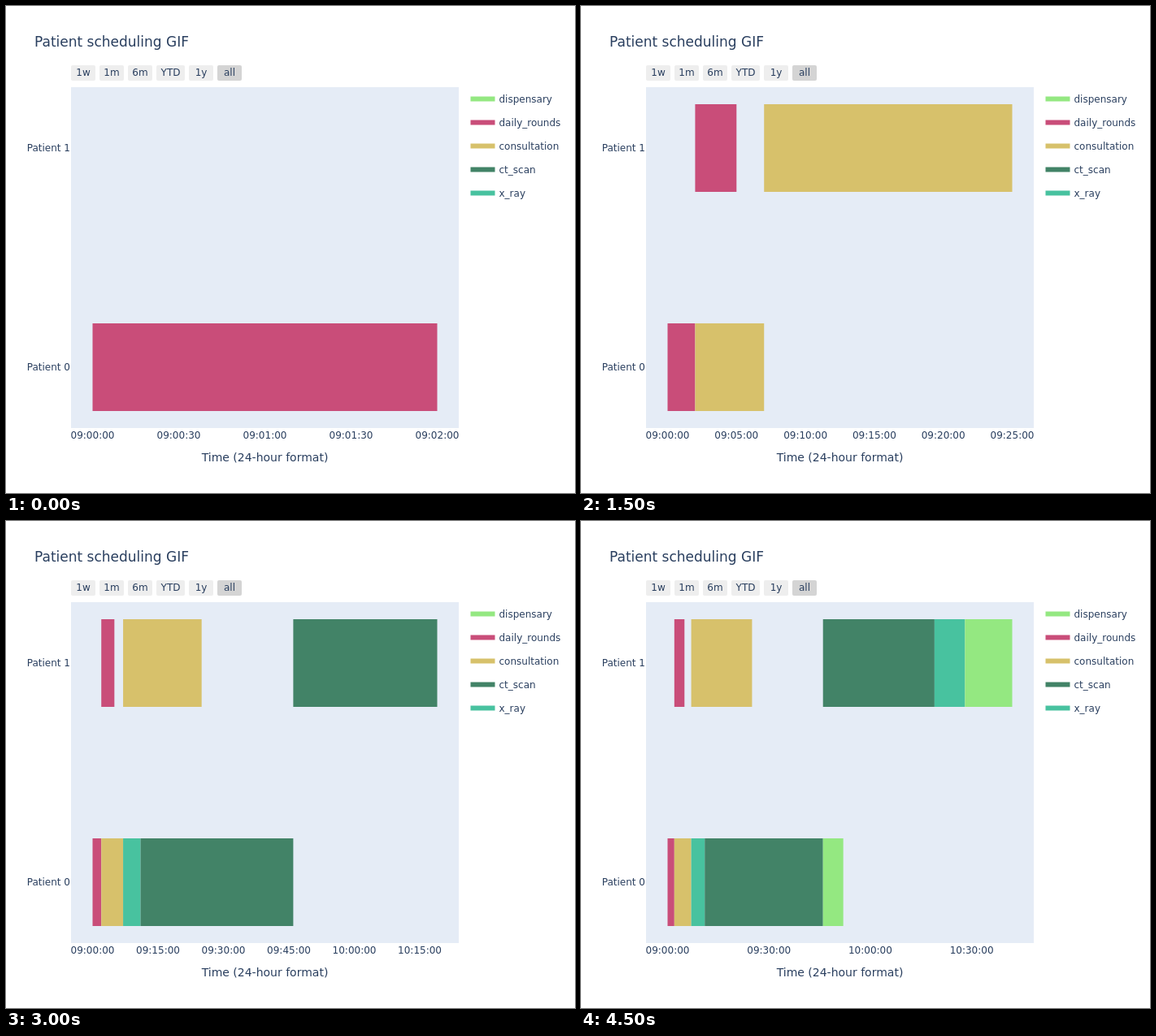
Animation, 700 px wide and 600 px high, one loop 5000 ms. Source, as an HTML page:

```html
<!DOCTYPE html>
<html lang="en">
<head>
<meta charset="utf-8">
<title>Patient scheduling</title>
<style>
  html, body { margin: 0; width: 100%; height: 100%; overflow: hidden; background: #fff; }
  svg { display: block; width: 700px; height: 600px; }
  text { font: 12px "DejaVu Sans", sans-serif; fill: #2a3f5f; white-space: pre; }
</style>
</head>
<body>
<svg id="stage" viewBox="0 0 700 600"></svg>
<script>
const stage = document.getElementById('stage');
const STEP_MS = 500;
const PLOT = { left: 80, top: 100, width: 477, height: 420 };
const PAD = PLOT.width / 18;
const ROW_Y = [445, 175];
const BAR_HALF = 54;

const COLORS = {
  dispensary: '#94e881',
  daily_rounds: '#c94d79',
  consultation: '#d7c16b',
  ct_scan: '#428367',
  x_ray: '#48c29f'
};

// One task is added per step: patient, task, start and end in minutes after 09:00.
const TASKS = [
  [0, 'daily_rounds', 0, 2],
  [1, 'daily_rounds', 2, 5],
  [0, 'consultation', 2, 7],
  [1, 'consultation', 7, 25],
  [0, 'x_ray', 7, 11],
  [0, 'ct_scan', 11, 46],
  [1, 'ct_scan', 46, 79],
  [0, 'dispensary', 46, 52],
  [1, 'x_ray', 79, 88],
  [1, 'dispensary', 88, 102]
];
const TICK_SIZES = [0.5, 1, 2, 5, 10, 15, 30];

function add(parent, tag, attrs) {
  const el = document.createElementNS('http://www.w3.org/2000/svg', tag);
  for (const key in attrs) el.setAttribute(key, attrs[key]);
  return parent.appendChild(el);
}

function rect(parent, x, y, width, height, fill, rx = 0) {
  return add(parent, 'rect', { x, y, width, height, fill, rx });
}

function label(parent, content, x, y, anchor = 'start', size = 12) {
  const el = add(parent, 'text', { x, y, 'text-anchor': anchor });
  el.style.fontSize = size + 'px';
  el.textContent = content;
}

function clock(minutes) {
  const seconds = 9 * 3600 + minutes * 60;
  return [seconds / 3600, seconds / 60 % 60, seconds % 60]
    .map(part => String(Math.floor(part)).padStart(2, '0')).join(':');
}

function drawFrame() {
  label(stage, 'Patient scheduling GIF', 35, 50, 'start', 17);
  let x = 80;
  for (const name of ['1w', '1m', '6m', 'YTD', '1y', 'all']) {
    const width = name === 'YTD' ? 35 : 30;
    rect(stage, x, 73, width, 19, name === 'all' ? '#d4d4d4' : '#eeeeee', 2);
    label(stage, name, x + width / 2, 86, 'middle');
    x += width + 5;
  }
  rect(stage, PLOT.left, PLOT.top, PLOT.width, PLOT.height, '#e5ecf6');
  ROW_Y.forEach((y, i) => label(stage, 'Patient ' + i, 79, y + 4, 'end'));
  label(stage, 'Time (24-hour format)', 318.5, 561, 'middle', 14);
  Object.entries(COLORS).forEach(([name, color], i) => {
    const y = 114.5 + 29 * i;
    rect(stage, 571.5, y - 3, 30, 6, color);
    label(stage, name, 606.5, y + 4.5);
  });
}

function drawStep(count) {
  const group = add(stage, 'g', { visibility: 'hidden' });
  const tasks = TASKS.slice(0, count);
  const end = Math.max(...tasks.map(task => task[3]));
  const scale = (PLOT.width - 2 * PAD) / end;
  const toX = minutes => PLOT.left + PAD + minutes * scale;

  for (const [patient, name, from, to] of tasks) {
    rect(group, toX(from), ROW_Y[patient] - BAR_HALF, (to - from) * scale, 2 * BAR_HALF, COLORS[name]);
  }
  const range = PLOT.width / scale;
  const tick = TICK_SIZES.find(size => size >= range / 7);
  for (let m = 0; m <= end + PAD / scale; m += tick) {
    label(group, clock(m), toX(m), 533, 'middle');
  }
  return group;
}

drawFrame();
const steps = TASKS.map((_, i) => drawStep(i + 1));
const start = performance.now();
let shown = -1;

function render() {
  const current = Math.floor((performance.now() - start) / STEP_MS) % steps.length;
  if (current !== shown) {
    steps.forEach((group, i) => group.setAttribute('visibility', i === current ? 'visible' : 'hidden'));
    shown = current;
  }
  requestAnimationFrame(render);
}
render();
</script>
</body>
</html>
```
